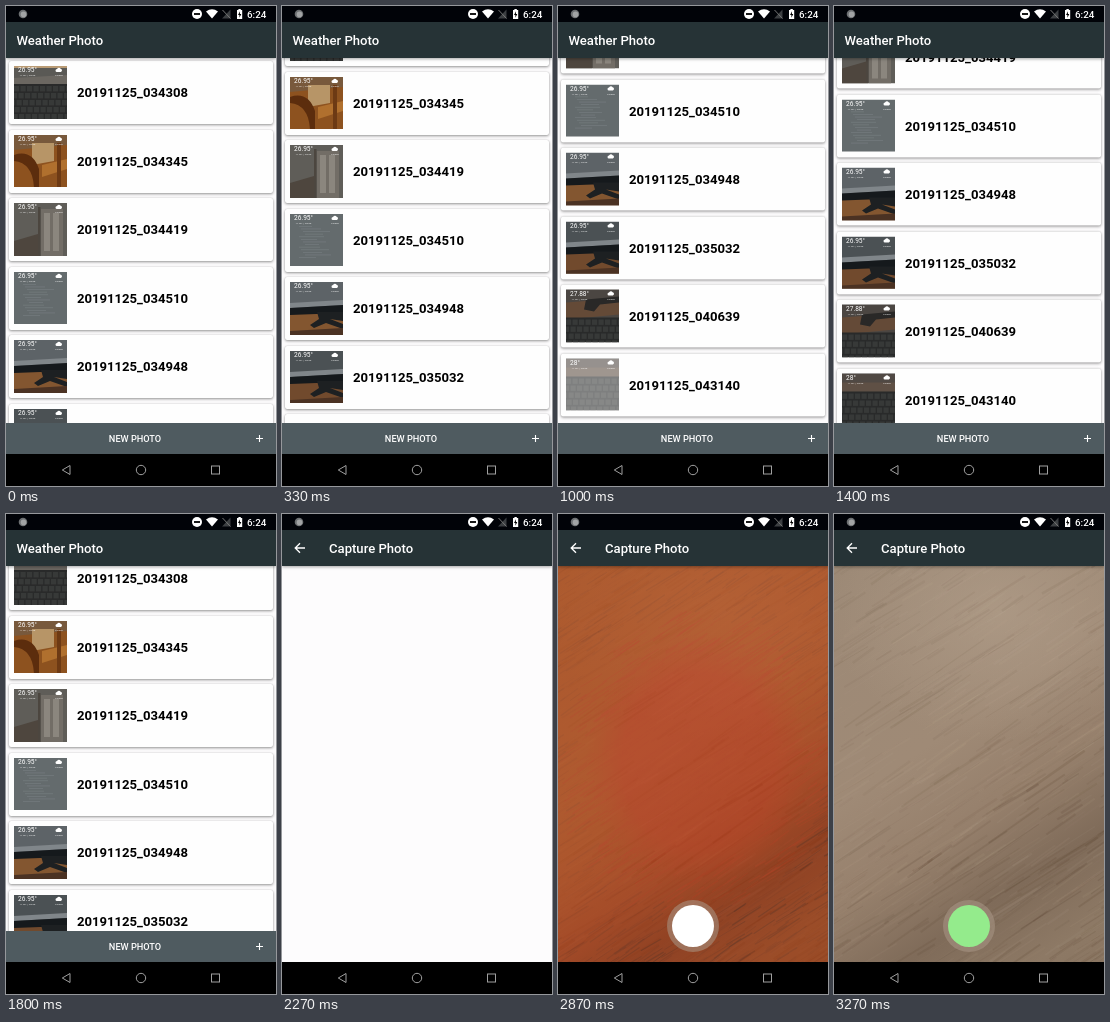
Recreate the animation shown at these times as an HTML page with a canvas. Size 270 by 480 pixels, loop 8 s.

```html
<!DOCTYPE html>
<html lang="en">
<head>
<meta charset="utf-8">
<title>Weather Photo</title>
<style>
  :root { --t: 0; }
  html, body { margin: 0; width: 270px; height: 480px; overflow: hidden; background: #000; }
  body { position: relative; font-family: Roboto, "Open Sans", sans-serif; }
  body *, body { box-sizing: border-box; }
  .anim { animation: 8s linear infinite paused; animation-delay: calc(var(--t) * -1ms); }
  .chrome { position: absolute; inset: 0; z-index: 3; }
  .screen { position: absolute; left: 0; top: 16px; width: 270px; height: 432px; overflow: hidden; background: #fdfcfd; }
  .bar { position: absolute; z-index: 2; left: 0; top: 0; width: 270px; height: 36px; background: #263336;
    box-shadow: 0 1px 3px rgba(0,0,0,.35); color: #fff; font: 500 13.1px/37px Roboto, sans-serif; white-space: nowrap; }
  .bar span { position: absolute; left: 10.5px; }
  .bar .inner { left: 47px; }
  .bar svg { position: absolute; left: 12px; top: 12px; }

  .list { position: absolute; left: 0; top: 36px; width: 270px; animation-name: scroll; }
  .card { position: absolute; left: 3px; width: 264px; height: 63px; border-radius: 2px; background: #fefefe;
    box-shadow: 0 1px 3px rgba(0,0,0,.42), 0 0 1px rgba(0,0,0,.2); }
  .card b { position: absolute; left: 68px; top: 0; font: 700 13.1px/64px Roboto, sans-serif; color: #000; }
  .card svg { position: absolute; left: 5px; top: 5px; }
  .late { animation-name: load; }
  .last { animation-name: loadLast; }
  .new { position: absolute; left: 0; top: 401px; width: 270px; height: 31px; background: #4f5b60; color: #fff;
    font: 500 9.2px/32px Roboto, sans-serif; }
  .new span { position: absolute; left: 69px; width: 120px; text-align: center; }
  .new svg { position: absolute; left: 249px; top: 11px; }

  .capture { z-index: 2; animation-name: enter; }
  .camera { position: absolute; left: 0; top: 36px; width: 270px; height: 396px; animation-name: preview; }
  .camera > *, .camera canvas { position: absolute; left: 0; top: 0; width: 270px; height: 396px; }
  .wood { background:
    radial-gradient(ellipse 170px 130px at 165px 45px, rgba(180,161,141,.6), rgba(180,161,141,0)),
    linear-gradient(146deg, #9c8976 0, #9f8a76 42%, #96806c 60%, #7f6b59 77%, #8d7965 92%, #8a7662); }
  .warm { animation-name: balance; background:
    radial-gradient(ellipse 112px 128px at 140px 195px, rgba(196,40,0,.95) 68%, rgba(196,40,0,0)),
    linear-gradient(146deg, #b83c00 0, #ba3900 50%, #b42e00 66%, #9a2700 80%, #a63000 93%); }
  .camera .shutter { left: 109px; top: 334px; width: 52px; height: 52px; border-radius: 50%; background: rgba(170,152,135,.55); }
  .shutter i { position: absolute; left: 5px; top: 5px; width: 42px; height: 42px; border-radius: 50%; animation-name: press; }

  @keyframes scroll {
    0% { transform: translateY(0); }
    2.5% { transform: translateY(-24px); }
    5% { transform: translateY(-75px); }
    7.5% { transform: translateY(-126px); }
    9.17% { transform: translateY(-163px); }
    10.83%, 16.66% { transform: translateY(-187.5px); }
    17.5% { transform: translateY(-172.5px); }
    20% { transform: translateY(-90px); }
    22.5% { transform: translateY(-22px); }
    24.1%, 100% { transform: translateY(0); }
  }
  @keyframes load { 0%, 7.6% { opacity: 0; } 11%, 100% { opacity: 1; } }
  @keyframes loadLast { 0%, 10% { opacity: 0; } 12.5% { opacity: .6; } 14.2%, 100% { opacity: 1; } }
  @keyframes enter {
    0%, 25.85% { opacity: 0; transform: translateY(33px); animation-timing-function: ease-out; }
    28.3%, 100% { opacity: 1; transform: none; }
  }
  @keyframes preview { 0%, 31.6% { opacity: 0; } 31.61%, 100% { opacity: 1; } }
  @keyframes balance { 0%, 34.1% { opacity: 1; } 38.4%, 100% { opacity: 0; } }
  @keyframes press { 0%, 39.9% { background: #fff; } 39.91%, 100% { background: #94eb8c; } }
</style>
</head>
<body>
<div class="screen">
  <div class="list anim" id="list"></div>
  <div class="bar"><span>Weather Photo</span></div>
  <div class="new"><span>NEW PHOTO</span>
    <svg width="9" height="9" stroke="#fff" stroke-width="1.1"><path d="M4.5 1v7M1 4.5h7"/></svg>
  </div>
</div>

<div class="screen capture anim">
  <div class="camera anim">
    <div class="wood"><canvas id="grain" width="270" height="396"></canvas></div>
    <div class="warm anim"><canvas id="streaks" width="270" height="396"></canvas></div>
    <div class="shutter"><i class="anim"></i></div>
  </div>
  <div class="bar">
    <svg width="12" height="12" fill="none" stroke="#fff" stroke-width="1.3"><path d="M11 6H1.5M6 1.2L1.2 6 6 10.8"/></svg>
    <span class="inner">Capture Photo</span>
  </div>
</div>

<svg class="chrome" width="270" height="480">
  <rect width="270" height="16" fill="#010308"/>
  <rect y="448" width="270" height="32"/>
  <circle cx="17" cy="8" r="4.3" fill="#6d7072"/><circle cx="17.5" cy="8.4" r="2.8" fill="#a2a4a5"/>
  <circle cx="191" cy="8" r="5" fill="#fff"/><rect x="188" y="7.1" width="6" height="1.8"/>
  <path d="M200 5.6Q206 1 212 5.6L206 12.6Z" fill="#fff"/>
  <path d="M224.5 3.5V12.5H216Z" fill="#3c3f42"/><path d="M216.5 4L224.5 12.5" stroke="#777"/>
  <path d="M231 4h1.4V3h2.4v1h1.4v9H231Z" fill="#fff"/><path d="M234 5.2L232 9h1.4v2.8L235.3 8h-1.4Z"/>
  <text x="241" y="12" font-size="9.8" font-weight="500" fill="#fff">6:24</text>
  <g fill="none" stroke="#a0a0a0">
    <path d="M64 459.5V468.5L56.3 464Z"/><circle cx="135" cy="464" r="4.7"/><rect x="205.5" y="460" width="8" height="8"/>
  </g>
</svg>

<script>
const box = (x, y, w, h, c) => `<rect x="${x}" y="${y}" width="${w}" height="${h}" fill="${c}"/>`;
const shape = (d, c) => `<path d="${d}" fill="${c}"/>`;

function keyboard(top) {
  let out = box(0, top, 53, 53 - top, '#292a2a');
  for (let y = top + 2, row = 0; y < 52; y += 7, row++)
    for (let x = -row * 2; x < 53; x += 6.5) out += box(x, y, 5.2, 5.4, '#373938');
  return out;
}

function page() {
  let out = box(0, 0, 53, 53, '#646b6d');
  for (let i = 0; i < 13; i++) out += box(9 + i % 4 * 2, 12 + i * 2.6, 13 + i * 7 % 16, .7, '#757c7f');
  return out;
}

const desk = (wall, wood) => box(0, 0, 53, 53, wall) + shape('M0 21L53 18V23L0 26Z', '#80868a') +
  shape('M0 31L53 28V53H0Z', wood) + shape('M0 26L53 23V31L0 33Z', '#15191c') +
  shape('M27 30H53V39L40 37L53 42V47L36 41L24 46L20 43L29 37Z', '#1d2022') + shape('M0 49L53 46V53H0Z', '#4b3223');

const photos = [
  box(0, 0, 53, 53, '#5a5955') + box(0, 0, 53, 2, '#b99b75') + shape('M0 12L53 9V19H0Z', '#6b6761') + keyboard(18),
  box(0, 0, 53, 53, '#8d521f') + shape('M0 0H53V10L0 15Z', '#78593c') + shape('M18 8H40V26L18 30Z', '#b79567') +
    shape('M0 20Q18 14 25 34V53H20Q19 28 0 26Z', '#5c2d0d') + shape('M28 30L53 24V34L28 42Z', '#b0702e') + box(43, 8, 4, 45, '#6d3a14'),
  box(0, 0, 53, 53, '#5f5d58') + box(27, 6, 22, 47, '#726d66') + box(30, 10, 6, 38, '#8b867e') +
    box(39, 10, 6, 38, '#8b867e') + box(24, 4, 2.5, 49, '#4c463f') + shape('M0 38L24 31V53H0Z', '#4e463e'),
  page(),
  desk('#5d6367', '#835630'),
  desk('#4b5154', '#714a2d'),
  box(0, 0, 53, 53, '#4b4642') + shape('M0 13L53 9V25L0 30Z', '#644a37') + shape('M20 10L53 7V13L34 15L28 22L18 20Z', '#292827') + keyboard(28),
  box(0, 0, 53, 53, '#5f5045') + box(0, 0, 53, 9, '#504944') + keyboard(18)
];
const stamps = '034308 034345 034419 034510 034948 035032 040639 043140'.split(' ');
const temps = { 6: '27.88°', 7: '28°' };
const fades = { 6: 'anim late', 7: 'anim last' };

list.innerHTML = stamps.map((stamp, i) => `
  <div class="card" style="top:${3 + i * 68.5}px">
    <svg class="${fades[i] || ''}" width="52.5" height="52.5" viewBox="0 0 52.5 52.5">${photos[i]}
      <g fill="#fff">
        <text x="4" y="6.3" font-size="6.6">${temps[i] || '26.95°'}</text>
        <text x="5.5" y="10" font-size="2.5">11.00° / 28.00°</text>
        <text x="41" y="10" font-size="2.5">Clouds</text>
        <path d="M43 6a1.5 1.5 0 0 1 0-3a2 2 0 0 1 3.6-.3a1.7 1.7 0 0 1 .2 3.3Z"/>
      </g>
    </svg>
    <b>20191125_${stamp}</b>
  </div>`).join('');

// Wood grain: seeded strokes along one slanted direction.
let seed = 7;
const rand = () => (seed = seed * 16807 % 2147483647) / 2147483647;

function drawGrain(canvas, count, length, width, color) {
  const ctx = canvas.getContext('2d');
  for (let i = 0; i < count; i++) {
    const x = rand() * 330 - 50, y = rand() * 440;
    const len = length * (.3 + rand()), angle = -.58 + (rand() - .5) * .12;
    const dx = len * Math.cos(angle), dy = len * Math.sin(angle);
    ctx.strokeStyle = color(x + dx / 2, y + dy / 2);
    ctx.lineWidth = width * (.3 + rand());
    ctx.beginPath();
    ctx.moveTo(x, y);
    ctx.lineTo(x + dx, y + dy);
    ctx.stroke();
  }
}

// Position across the grain: 0 at the top left, 1 at the bottom right.
const across = (x, y) => .5 + ((x - 135) * .56 + (y - 198) * .83) / 479;

drawGrain(grain, 800, 55, 2, (x, y) => {
  const alpha = .02 + rand() * .05;
  return rand() < .5 ? `rgba(70,48,30,${alpha * (across(x, y) > .6 ? 2 : 1)})` : `rgba(205,188,168,${alpha})`;
});
drawGrain(streaks, 1500, 32, 1.2, (x, y) => {
  const ring = Math.hypot((x - 140) / 112, (y - 195) / 128);
  if (ring < 1.15) return `rgba(196,40,0,${ring > .8 ? .5 : .2})`;
  const band = Math.max(0, 1 - Math.abs(across(x, y) - .81) / .16);
  return `rgba(85,22,0,${rand() * (.16 + band * .55)})`;
});

// The picture advances at 15 steps per second.
let shown = -1;
function draw() {
  const step = Math.floor(performance.now() % 8000 * .015 + .06);
  if (step !== shown) {
    shown = step;
    document.documentElement.style.setProperty('--t', Math.min(step * 1000 / 15, 7999));
  }
  requestAnimationFrame(draw);
}
draw();
</script>
</body>
</html>
```
